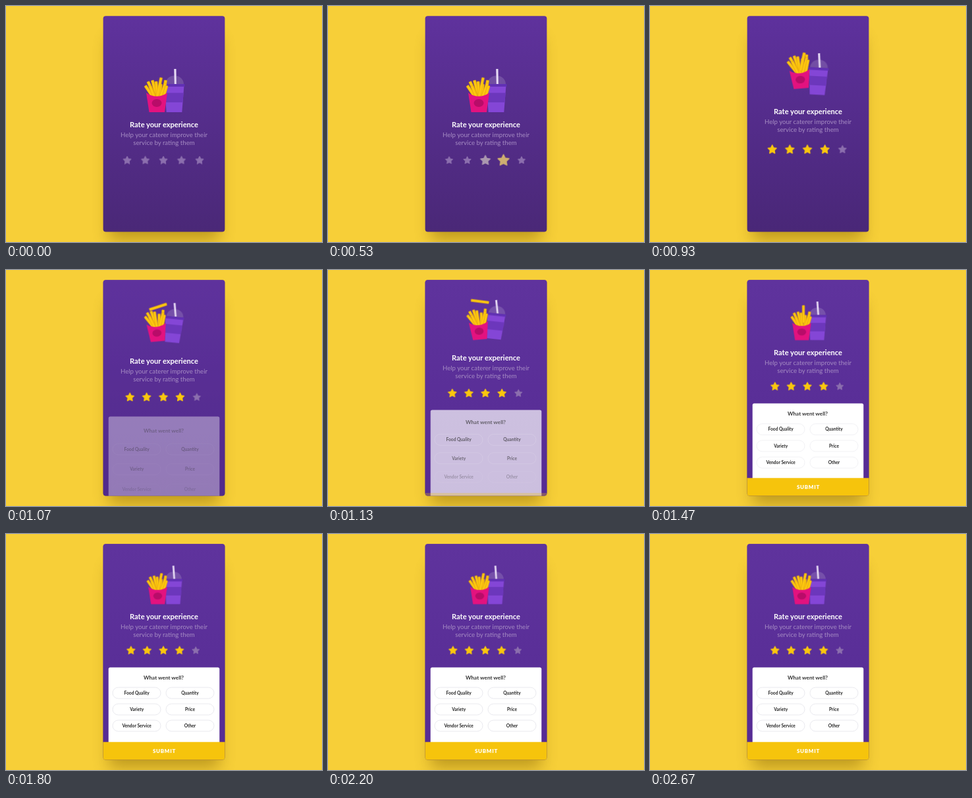
Write an HTML page that moves like this. It is 480 by 360 pixels and loops after 2870 ms.

```html
<!DOCTYPE html>
<html lang="en">
<head>
<meta charset="utf-8">
<title>Rate your experience</title>
<style>
html, body { margin: 0; width: 100%; height: 100%; overflow: hidden; background: #f7cf38; }
svg { display: block; width: 480px; height: 360px; font-family: Lato, "Open Sans", sans-serif; }
svg * { animation-duration: 2870ms; animation-timing-function: linear; animation-iteration-count: infinite; }
text { text-anchor: middle; }
.title { font-size: 11.1px; font-weight: 700; fill: #fff; }
.sub { font-size: 9.65px; fill: #a58bc3; }
.ask { font-size: 8.2px; font-weight: 700; fill: #333; }
.label { font-size: 6.65px; font-weight: 700; fill: #222; }
.send { font-size: 8px; font-weight: 900; fill: #fff; letter-spacing: .7px; }

/* Header moves up while the form arrives */
.bright { animation-name: bright; }
.rise { animation-name: rise; }
.hero { animation-name: hero; transform-origin: 242px 162px; }
.row { animation-name: row; transform-origin: 239px 235.5px; }
@keyframes bright { 0%, 32.4% { opacity: 0; } 39.4%, 100% { opacity: 1; } }
@keyframes rise {
  0%, 24.91% { transform: none; animation-timing-function: cubic-bezier(.4,0,.2,1); }
  50.17%, 100% { transform: translateY(-55px); }
}
@keyframes hero {
  0%, 24.91% { transform: translateY(0) scale(1); animation-timing-function: cubic-bezier(.4,0,.2,1); }
  50.17%, 100% { transform: translateY(-55px) scale(.89); }
}
@keyframes row {
  0%, 25.44% { transform: translateY(0) scale(1); animation-timing-function: cubic-bezier(.4,0,.2,1); }
  51.39%, 100% { transform: translateY(-57.7px) scale(.895); }
}

/* Food hop */
.cup { animation-name: cup; transform-origin: 255px 162px; }
.straw { animation-name: straw; transform-origin: 257px 119px; }
.toss { animation-name: toss; transform-origin: 229px 162px; }
.stalks { animation-name: stalks; }
.fly { animation-name: fly; }
@keyframes cup {
  0%, 22.65% { transform: translate(0, 0) rotate(0deg); animation-timing-function: ease-in; }
  32.4% { transform: translate(-1px, -7px) rotate(3deg); animation-timing-function: ease-out; }
  39.37% { transform: translate(-2.5px, -11px) rotate(6deg); }
  44.25% { transform: translate(-2.5px, -5px) rotate(6deg); animation-timing-function: ease-out; }
  52.26%, 100% { transform: translate(0, 0) rotate(0deg); }
}
@keyframes straw {
  0%, 22.65% { transform: rotate(0deg); }
  32.4% { transform: rotate(-5deg); }
  39.37%, 44.25% { transform: rotate(-11deg); animation-timing-function: ease-out; }
  52.26%, 100% { transform: rotate(-3deg); }
}
@keyframes toss {
  0%, 22.65% { transform: translate(0, 0) rotate(0deg); animation-timing-function: ease-in-out; }
  32.4% { transform: translate(0, -17px) rotate(-5deg); }
  39.37% { transform: translate(.5px, -10px) rotate(-5deg); }
  44.25% { transform: translate(.5px, -2px) rotate(-2deg); animation-timing-function: ease-out; }
  50.52%, 100% { transform: translate(0, 0) rotate(0deg); }
}
@keyframes stalks {
  0%, 22.65% { transform: translateY(0); }
  32.4% { transform: translateY(-4px); }
  39.37% { transform: translateY(-2px); }
  50.52%, 100% { transform: translateY(0); }
}
@keyframes fly {
  0%, 22.65% { transform: translate(232.6px, 124px) rotate(-78deg); animation-timing-function: ease-in-out; }
  32.4% { transform: translate(231px, 103px) rotate(-78deg); }
  39.37% { transform: translate(229.6px, 88px) rotate(7deg); }
  44.25% { transform: translate(229.8px, 95px) rotate(34deg); }
  48.78% { transform: translate(231px, 108px) rotate(72deg); }
  52.96%, 100% { transform: translate(232.6px, 124px) rotate(102deg); }
}

/* Stars swell and fill from the tapped one leftwards */
.star { fill: #8c6fae; stroke: #8c6fae; stroke-width: 1.2; stroke-linejoin: round; }
.s1 { animation-name: s1; }
.s2 { animation-name: s2; }
.s3 { animation-name: s3; }
.s4 { animation-name: s4; }
.s5 { animation-name: s5; }
@keyframes s1 {
  0%, 8% { transform: scale(1); fill: #8c6fae; stroke: #8c6fae; }
  18.47%, 20.9% { transform: scale(.93); fill: #8c6fae; stroke: #8c6fae; }
  26.83% { transform: scale(1.3); fill: #e0b53a; stroke: #e0b53a; }
  31.36%, 100% { transform: scale(1.14); fill: #fac70e; stroke: #fac70e; }
}
@keyframes s2 {
  0%, 8% { transform: scale(1); fill: #8c6fae; stroke: #8c6fae; }
  18.47% { transform: scale(.93); fill: #8c6fae; stroke: #8c6fae; }
  24.39% { transform: scale(1.35); fill: #d8b054; stroke: #d8b054; }
  29.27%, 100% { transform: scale(1.14); fill: #fac70e; stroke: #fac70e; }
}
@keyframes s3 {
  0%, 11.5% { transform: scale(1); fill: #8c6fae; stroke: #8c6fae; }
  18.47% { transform: scale(1.22); fill: #ab97b0; stroke: #ab97b0; }
  21.6% { transform: scale(1.4); fill: #d0ae70; stroke: #d0ae70; }
  27.18%, 100% { transform: scale(1.14); fill: #fac70e; stroke: #fac70e; }
}
@keyframes s4 {
  0%, 8% { transform: scale(1); fill: #8c6fae; stroke: #8c6fae; }
  18.47% { transform: scale(1.4); fill: #cfae72; stroke: #cfae72; }
  22.3% { transform: scale(1.32); fill: #f0c020; stroke: #f0c020; }
  27.87%, 100% { transform: scale(1.14); fill: #fac70e; stroke: #fac70e; }
}
@keyframes s5 {
  0%, 8% { transform: scale(1); }
  18.47%, 22.3% { transform: scale(.92); }
  31.36%, 100% { transform: scale(1); }
}

/* Form: lower rows trail further behind (--lag) */
.panel { animation-name: panel; }
.sheet { animation-name: sheet; }
.lag { animation-name: lag; }
.chip { fill: none; stroke: #e4e4ea; stroke-width: .8; animation-name: chip; }
.submit { animation-name: submit; }
@keyframes panel {
  0%, 34.84% { transform: translateY(32px); }
  39.37% { transform: translateY(10px); }
  44.25% { transform: translateY(2px); animation-timing-function: ease-out; }
  50.52%, 100% { transform: none; }
}
@keyframes sheet {
  0%, 34.84% { opacity: 0; }
  39.37% { opacity: .7; }
  44.25% { opacity: .94; }
  48.78%, 100% { opacity: 1; }
}
@keyframes lag {
  0%, 34.84% { transform: translateY(calc(var(--lag) * 2.5)); opacity: 0; }
  39.37% { transform: translateY(var(--lag)); opacity: var(--seen); }
  44.25% { transform: translateY(calc(var(--lag) * .43)); opacity: .95; animation-timing-function: ease-out; }
  55.75%, 100% { transform: none; opacity: 1; }
}
@keyframes chip {
  0%, 34.84% { stroke: #fff; stroke-opacity: 0; }
  39.37% { stroke: #fff; stroke-opacity: .3; }
  44.25% { stroke: #f4f4f8; stroke-opacity: .6; }
  55.75%, 100% { stroke: #e4e4ea; stroke-opacity: 1; }
}
@keyframes submit {
  0%, 36.6% { transform: translateY(29px); opacity: 0; }
  39.37% { transform: translateY(23px); opacity: .3; }
  44.25% { transform: translateY(7px); opacity: .78; animation-timing-function: ease-out; }
  50.52%, 100% { transform: none; opacity: 1; }
}
</style>
</head>
<body>
<svg viewBox="0 0 480 360">
  <defs>
    <linearGradient id="dusk" x2="0" y2="1">
      <stop stop-color="#5f329d"/>
      <stop offset="1" stop-color="#4a2877"/>
    </linearGradient>
    <linearGradient id="dawn" x2="0" y2="1">
      <stop stop-color="#5f339d"/>
      <stop offset="1" stop-color="#552b93"/>
    </linearGradient>
    <filter id="blur" x="-40%" y="-30%" width="180%" height="160%"><feGaussianBlur stdDeviation="12"/></filter>
    <clipPath id="card"><rect x="147.6" y="15.2" width="184.8" height="329.2" rx="4"/></clipPath>
    <rect id="fry" x="-15" y="-2.1" width="30" height="4.2" rx=".5" fill="#fdc70f" stroke="#dc9c10" stroke-width=".5"/>
    <path id="star" d="M0-6.2 1.82-2.51 5.9-1.92 2.95.96 3.64 5.02 0 3.1-3.64 5.02-2.95.96-5.9-1.92-1.82-2.51Z"/>
    <rect id="pill" width="73" height="17" rx="8.5"/>
  </defs>

  <rect width="480" height="360" fill="#f7cf38"/>
  <rect x="156" y="50" width="168" height="307" fill="#7a5c00" opacity=".46" filter="url(#blur)"/>

  <g clip-path="url(#card)">
    <rect x="147" y="15" width="186" height="330" fill="url(#dusk)"/>
    <rect class="bright" x="147" y="15" width="186" height="330" fill="url(#dawn)"/>

    <g class="hero">
      <g class="cup">
        <path d="M242 119C243 102 269 102 270 119Z" fill="#fff" opacity=".15"/>
        <path class="straw" d="M255.3 96h3.2l.3 23h-3Z" fill="#e6daf4"/>
        <path d="M240.5 121h30L267.3 162H243.7Z" fill="#8446d6"/>
        <path d="M241.3 132.5h28.3l-1.1 14.5H242.5Z" fill="#6c37bc"/>
        <rect x="239.5" y="119" width="32" height="4" rx="1" fill="#6130b4"/>
      </g>
      <g class="toss">
        <g class="stalks">
          <use href="#fry" transform="translate(234 134) rotate(-85)"/>
          <use href="#fry" transform="translate(220 134) rotate(56)"/>
          <use href="#fry" transform="translate(240 128) rotate(-80)"/>
          <use href="#fry" transform="translate(226 128) rotate(76)"/>
          <use href="#fry" transform="translate(222 129) rotate(65)"/>
          <use href="#fry" transform="translate(237 132) rotate(-70)"/>
          <use href="#fry" transform="translate(229 130) rotate(86)"/>
          <use href="#fry" transform="translate(224 136) rotate(69)"/>
          <use href="#fry" transform="translate(240 136) rotate(-74)"/>
        </g>
      </g>
      <g class="fly"><use href="#fry"/></g>
      <g class="toss">
        <path d="M213 132.5Q229 143 245 132.5L241 162H217.5Z" fill="#e3127f"/>
        <ellipse cx="229" cy="148" rx="7.5" ry="6" fill="#b80c69"/>
      </g>
    </g>

    <g class="rise">
      <text class="title" x="240" y="184.6">Rate your experience</text>
      <text class="sub" x="240" y="200.4">Help your caterer improve their</text>
      <text class="sub" x="240" y="211.9">service by rating them</text>
    </g>

    <g class="row">
      <g transform="translate(184 235.5)"><use href="#star" class="star s1"/></g>
      <g transform="translate(211.5 235.5)"><use href="#star" class="star s2"/></g>
      <g transform="translate(239 235.5)"><use href="#star" class="star s3"/></g>
      <g transform="translate(266.5 235.5)"><use href="#star" class="star s4"/></g>
      <g transform="translate(294 235.5)"><use href="#star" class="star s5"/></g>
    </g>

    <g class="panel">
      <rect class="sheet" x="155.7" y="203.4" width="168.6" height="180" rx="2.5" fill="#fff"/>
      <g class="lag" style="--lag:3.5px;--seen:.68">
        <text class="ask" x="239.5" y="222">What went well?</text>
      </g>
      <g class="lag" style="--lag:6.5px;--seen:.65">
        <use href="#pill" class="chip" x="162" y="234"/>
        <use href="#pill" class="chip" x="243" y="234"/>
        <text class="label" x="198.7" y="244.9">Food Quality</text>
        <text class="label" x="279.5" y="244.9">Quantity</text>
      </g>
      <g class="lag" style="--lag:9.8px;--seen:.55">
        <use href="#pill" class="chip" x="162" y="259"/>
        <use href="#pill" class="chip" x="243" y="259"/>
        <text class="label" x="198.7" y="269.9">Variety</text>
        <text class="label" x="279.5" y="269.9">Price</text>
      </g>
      <g class="lag" style="--lag:13.3px;--seen:.28">
        <use href="#pill" class="chip" x="162" y="284"/>
        <use href="#pill" class="chip" x="243" y="284"/>
        <text class="label" x="198.7" y="294.9">Vendor Service</text>
        <text class="label" x="279.5" y="294.9">Other</text>
      </g>
    </g>

    <g class="submit">
      <rect x="147" y="317.3" width="186" height="28" fill="#f6c40c"/>
      <text class="send" x="240.5" y="333.7">SUBMIT</text>
    </g>
  </g>
</svg>
</body>
</html>
```
